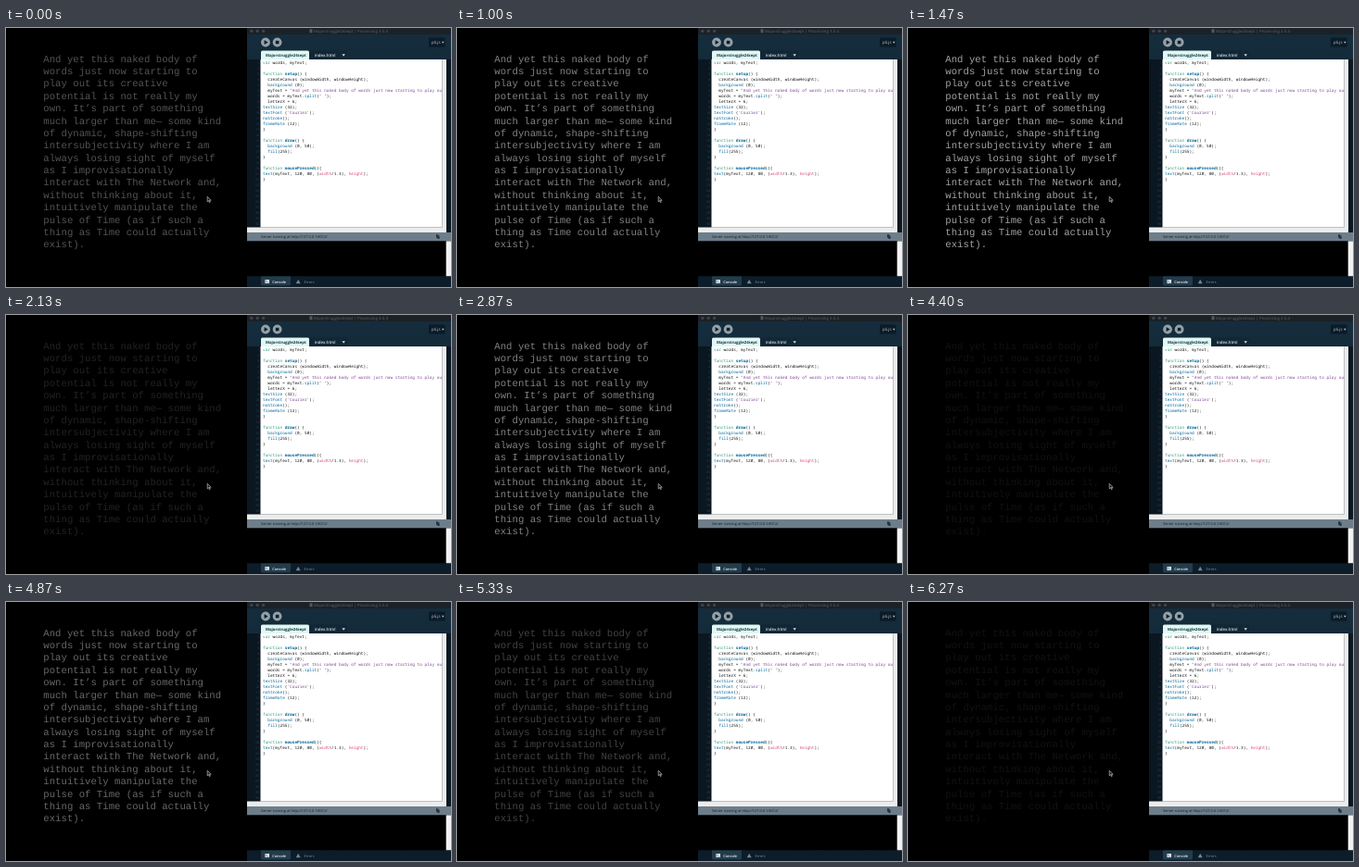
These frames come from a looping animation (480x280 px, 6340 ms). An HTML page:

```html
<!DOCTYPE html>
<html lang="en">
<head>
<meta charset="utf-8">
<title>Pulse of Time</title>
<style>
  html, body { margin: 0; width: 100%; height: 100%; overflow: hidden; background: #000; }
  svg { display: block; width: 100vw; height: 100vh; }
  text { white-space: pre; text-rendering: geometricPrecision; }
  #poem { font: 10.66px "Liberation Mono", "Courier New", monospace; fill: #a2a2a2; }
  #code { font: 4.42px "Noto Sans Mono", "DejaVu Sans Mono", monospace; fill: #111; }
  #code .keyword { fill: #33997e; }
  #code .call { fill: #006699; }
  #code .handler { fill: #006699; font-weight: bold; }
  #code .value { fill: #d94a7a; }
  #code .string { fill: #7d4793; }
  .ui { font: 4.4px "Open Sans", "Noto Sans", sans-serif; }
  .small { font-size: 3.9px; }
  .bold { font-weight: 600; }
</style>
</head>
<body>
<svg viewBox="0 0 480 280" preserveAspectRatio="none">
  <defs>
    <linearGradient id="shade" x1="0" y1="0" x2="0" y2="1">
      <stop offset="0" stop-color="#152d3d"/>
      <stop offset="1" stop-color="#0b1722"/>
    </linearGradient>
    <clipPath id="page"><rect x="275" y="34" width="195.5" height="181.5"/></clipPath>
  </defs>
  <rect width="480" height="280"/>
  <g id="poem"></g>

  <!-- editor window -->
  <rect x="260" width="220" height="280" fill="url(#shade)"/>
  <rect x="260" width="220" height="7" fill="#1b2127"/>
  <g fill="#3f484f">
    <circle cx="264.8" cy="3.3" r="1.6"/>
    <circle cx="271.2" cy="3.3" r="1.6"/>
    <circle cx="277.6" cy="3.3" r="1.6"/>
  </g>
  <path d="M327.5 1.2h3v4h-3z" fill="#50575d"/>
  <text class="ui" x="372" y="4.9" text-anchor="middle" fill="#5d646a">Majorstruggle24sept | Processing 3.5.4</text>

  <g fill="#94a1a9">
    <circle cx="280" cy="15.5" r="4.9"/>
    <circle cx="292.6" cy="15.5" r="4.9"/>
  </g>
  <path d="M278.6 13l4 2.5-4 2.5zM290.8 13.7h3.6v3.6h-3.6z" fill="#101e29"/>
  <rect x="456" y="10.5" width="17.5" height="10" rx="1" fill="#0b1b27"/>
  <text class="ui" x="459" y="17" fill="#c5ced4">p5.js</text>
  <path d="M470 14.8h2.6l-1.3 2z" fill="#c5ced4"/>

  <path d="M275 34.2V26q0-1.5 1.5-1.5h49q1.5 0 1.5 1.5v8.2z" fill="#e2f7f5"/>
  <text class="ui" x="280" y="30.8" style="font-weight:700;font-size:4.25px" fill="#12393f">Majorstruggle24sept</text>
  <path d="M328 34V26q0-1.5 1.5-1.5h30q1.5 0 1.5 1.5v8zM362 34V26q0-1.5 1.5-1.5h3q1.5 0 1.5 1.5v8z" fill="#122735"/>
  <text class="ui bold" x="332.8" y="30.8" fill="#d8e1e7">index.html</text>
  <path d="M362.5 28.2h3.4l-1.7 2.6z" fill="#d8e1e7"/>

  <rect x="260" y="34" width="220" height="187" fill="#0a1721"/>
  <rect x="260" y="215.5" width="215" height="5.5" fill="#ececec"/>
  <rect x="470.5" y="34" width="4.5" height="187" fill="#ececec"/>
  <rect x="274.5" y="34" width="196" height="181.5" fill="#fff"/>
  <g id="gutter" class="ui" fill="#33434f" text-anchor="end"></g>
  <g id="code" clip-path="url(#page)"></g>

  <rect x="260" y="221" width="220" height="9.5" fill="#6d7e8a"/>
  <text class="ui small" x="275" y="227.3" fill="#111c25">Server running at http://127.0.0.1:8012/</text>
  <path d="M464 223.3h2.3v3.5h-2.3zM465.3 224.5h2.3v3.5h-2.3z" fill="#26343f"/>
  <rect x="260" y="230.5" width="215" height="38" fill="#000"/>
  <rect x="474.7" y="230.5" width="5.3" height="38" fill="#f2f2f2"/>
  <rect x="260" y="268.5" width="220" height="11.5" fill="#0c1c29"/>
  <path d="M275 268.5h32v8.5q0 1.5-1.5 1.5h-29q-1.5 0-1.5-1.5z" fill="#233c4c"/>
  <path d="M279.4 272.1h4.6v4h-4.6z" fill="#dfe7ec"/>
  <path d="M280.2 273l1.2 1-1.2 1M282 275.3h1.2" fill="none" stroke="#233c4c" stroke-width=".5"/>
  <text class="ui small bold" x="287.2" y="275.6" fill="#e5ebef">Console</text>
  <path d="M315.2 271.9l2.5 4.3h-5z" fill="#758691"/>
  <text class="ui small" x="321.5" y="275.6" fill="#84939d">Errors</text>

  <path d="M217.2 182.3v5.4l1.3-1.1.9 2 .9-.4-.9-1.9h1.7z" fill="#111" stroke="#ddd" stroke-width=".6"/>
</svg>
<script>
const LOOP = 6340, STEP = 1000 / 12, FADE = 0.8, GHOST = 0.1;
const clicks = [-330, 670, 900, 1470, 2670, 2780, 3440, 4690, 4930, 5400];

const poemLines = `And yet this naked body of
words just now starting to
play out its creative
potential is not really my
own. It’s part of something
much larger than me— some kind
of dynamic, shape-shifting
intersubjectivity where I am
always losing sight of myself
as I improvisationally
interact with The Network and,
without thinking about it,
intuitively manipulate the
pulse of Time (as if such a
thing as Time could actually
exist).`.split("\n");

const codeLines = `var words, myText;

function setup() {
  createCanvas (windowWidth, windowHeight);
  background (0);
  myText = "And yet this naked body of words just now starting to play out its creative";
  words = myText.split(" ");
  letterX = 6;
textSize (32);
textFont ('Courier');
noStroke();
frameRate (12);
}

function draw() {
  background (0, 50);
  fill(255);
}

function mousePressed(){
text(myText, 120, 80, (width/1.3), height);
}`.split("\n");

const tokenRules = [
  ["string", /^["']/],
  ["keyword", /^(var|function)$/],
  ["handler", /^(setup|draw|mousePressed)$/],
  ["call", /^(background|split|textSize|textFont|noStroke|frameRate|fill|text)$/],
  ["value", /^(width|height)$/],
];

function addText(parent, x, y, content = "") {
  const node = document.createElementNS("http://www.w3.org/2000/svg", "text");
  node.setAttribute("x", x);
  node.setAttribute("y", y);
  node.textContent = content;
  parent.append(node);
  return node;
}

function addCode(line, row) {
  const node = addText(code, 277, 39.4 + row * 6);
  for (const token of line.match(/"[^"]*"|'[^']*'|\w+|[^\w"']+/g) || []) {
    const span = document.createElementNS("http://www.w3.org/2000/svg", "tspan");
    const rule = tokenRules.find(([, pattern]) => pattern.test(token));
    if (rule) span.setAttribute("class", rule[0]);
    span.textContent = token;
    node.append(span);
  }
}

const poem = document.getElementById("poem");
const code = document.getElementById("code");
const gutter = document.getElementById("gutter");
poemLines.forEach((line, row) => addText(poem, 40.3, 36.6 + row * 13.38, line));
codeLines.forEach(addCode);
for (let row = 0; row < 30; row++) {
  addText(gutter, 273, 39.4 + row * 6, row + 1).style.fontSize = "3.6px";
}

// Each click redraws the poem; every sketch frame then veils it a little more.
function draw(now) {
  const time = now % LOOP;
  const last = clicks.filter(click => click <= time).pop();
  const level = FADE ** Math.floor((time - last) / STEP);
  poem.style.opacity = Math.max(level, GHOST);
  requestAnimationFrame(() => draw(performance.now() - start));
}
const start = performance.now();
draw(0);
</script>
</body>
</html>
```
